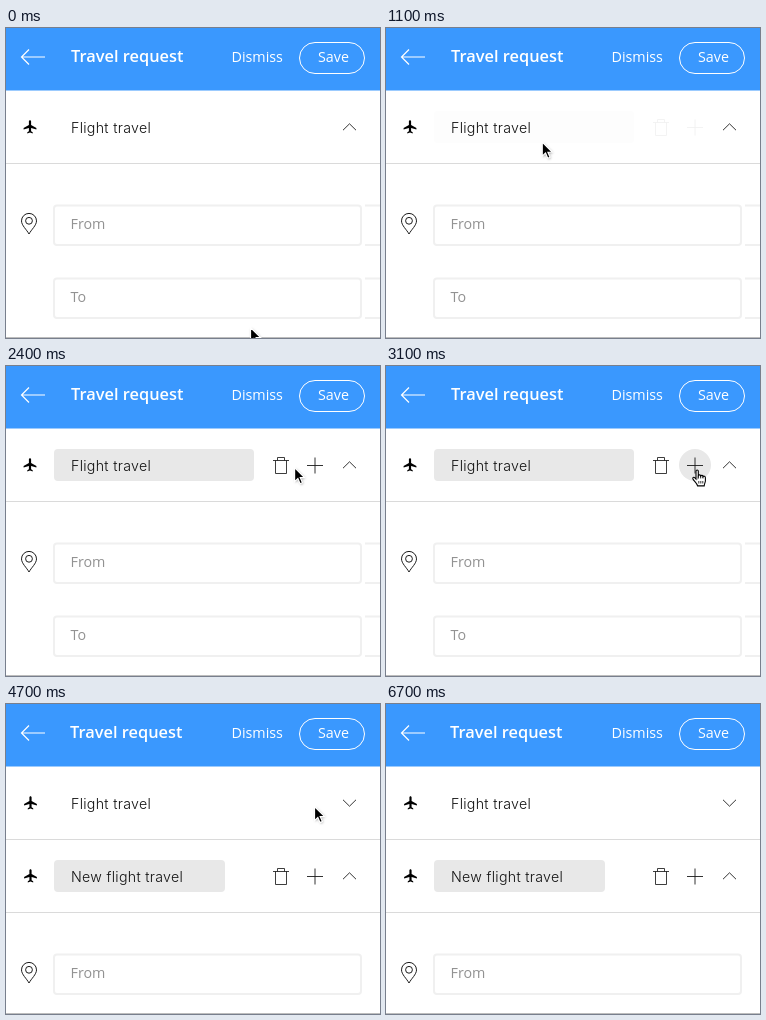
These frames come from a looping animation (374x310 px, 6800 ms). An HTML page with a canvas:

```html
<!DOCTYPE html>
<html lang="en">
<head>
<meta charset="utf-8">
<title>Travel request</title>
<style>
  html, body { margin: 0; width: 100%; height: 100%; overflow: hidden; background: #fff; }
  canvas { display: block; width: 374px; height: 310px; }
</style>
</head>
<body>
<canvas id="stage"></canvas>
<script>
const W = 374, H = 310, LOOP = 6800, STEP = 100;
const BLUE = '#3a98fe', INK = '#1c1c1c', GREY = '#e8e8e8', EDGE = '#f0f0f0';
const SANS = '14.3px "Open Sans", sans-serif';
const TITLE = '600 16.4px "Open Sans", sans-serif';
const LABEL = '300 14.2px Inter, sans-serif';
const scale = window.devicePixelRatio || 1;

function prepare(canvas) {
  canvas.width = Math.round(W * scale);
  canvas.height = Math.round(H * scale);
  const c = canvas.getContext('2d');
  c.scale(scale, scale);
  c.lineJoin = 'miter';
  return c;
}

// ---- drawing helpers ----

function text(c, str, x, y, font, color, spacing = 0) {
  c.font = font;
  c.letterSpacing = spacing + 'px';
  c.fillStyle = color;
  c.fillText(str, x, y);
}

function lines(c, d, color = INK, width = 1) {
  c.strokeStyle = color;
  c.lineWidth = width;
  c.stroke(new Path2D(d));
}

function box(c, x, y, w, h, r, fill, stroke, width = 1) {
  c.beginPath();
  c.roundRect(x, y, w, h, r);
  if (fill) { c.fillStyle = fill; c.fill(); }
  if (stroke) { c.strokeStyle = stroke; c.lineWidth = width; c.stroke(); }
}

function at(c, x, y, draw) {
  c.save();
  c.translate(x, y);
  draw(c);
  c.restore();
}

// ---- icons, each around its own origin ----

const PLANE = new Path2D(
  'M0 -6.8C.7 -6.8 1.1 -6.2 1.1 -5.4V-1.9L6.4 1.1V2.5L1.1 1V4.2L2.7 5.2V6.4' +
  'L0 5.6L-2.7 6.4V5.2L-1.1 4.2V1L-6.4 2.5V1.1L-1.1 -1.9V-5.4C-1.1 -6.2 -.7 -6.8 0 -6.8Z');

function plane(c) {
  c.fillStyle = '#000';
  c.fill(PLANE);
}

function pin(c) {
  lines(c, 'M0 12.8C-2.2 8.6 -7.5 4.2 -7.5 -.3A7.5 7.5 0 0 1 7.5 -.3C7.5 4.2 2.2 8.6 0 12.8Z');
  lines(c, 'M3.4 -.4A3.4 3.4 0 1 1 -3.4 -.4A3.4 3.4 0 1 1 3.4 -.4Z');
}

function trash(c) {
  lines(c, 'M-8 -5H8M-3.5 -5V-8H3.5V-5M-5.5 -5V8H5.5V-5', INK, .85);
}

function plus(c) {
  lines(c, 'M-8 0H8M0 -8V8', INK, .9);
}

function chevron(c, up) {
  lines(c, up ? 'M-6.5 3.2L0 -3.2L6.5 3.2' : 'M-6.5 -3.2L0 3.2L6.5 -3.2', INK, .9);
}

// ---- parts of the form ----

function header(c, titleX) {
  c.fillStyle = '#fff';
  c.fillRect(0, 0, W, H);
  c.fillStyle = BLUE;
  c.fillRect(0, 0, W, 62.5);
  lines(c, 'M39 29H15.5M23 21.5L15.5 29L23 36.5', '#fff', 1.2);
  text(c, 'Travel request', titleX, 34, TITLE, '#fff');
  text(c, 'Dismiss', 225.5, 34, SANS, '#fff');
  box(c, 293.5, 14.5, 65, 31, 15.5, null, '#fff');
  text(c, 'Save', 312, 34, SANS, '#fff');
  lines(c, 'M0 309.5H374', '#bdbdbd');
}

function row(c, y, label, planeX, open, highlight) {
  if (highlight) {
    box(c, 48, y - 16, highlight, 32, 4, GREY);
    at(c, 275, y + .5, trash);
    at(c, 309, y + .5, plus);
  }
  at(c, planeX, y, plane);
  text(c, label, 65, y + 5.5, LABEL, '#111', .3);
  at(c, 343.5, y, k => chevron(k, open));
  lines(c, `M0 ${y + 36.5}H374`, '#dadada');
}

function field(c, y, label) {
  box(c, 48, y + .5, 307, 39.5, 3, '#fff', EDGE, 2);
  text(c, label, 64.5, y + 24, SANS, '#929292');
}

function formView(highlight) {
  return c => {
    header(c, 65);
    row(c, 99, 'Flight travel', 24, true, highlight);
    at(c, 23, 193.2, pin);
    field(c, 177, 'From');
    field(c, 250, 'To');
  };
}

function addedView(c) {
  header(c, 64);
  row(c, 99, 'Flight travel', 24.5, false, 0);
  row(c, 172, 'New flight travel', 24.5, true, 171);
  at(c, 23, 266.2, pin);
  field(c, 250, 'From');
}

function layer(draw) {
  const canvas = document.createElement('canvas');
  draw(prepare(canvas));
  return canvas;
}

// ---- pointers ----

const ARROW = new Path2D('M.5 .5V14.6L3.8 11.5L6 16.6L8.4 15.6L6.2 10.6H10.7Z');
const HAND = new Path2D(
  'M4 1.6C4 .2 6.3 .2 6.3 1.6V6.2C6.6 5 8.6 5.1 8.7 6.5C9.2 5.5 11 5.7 11 7.1' +
  'C11.6 6.3 13.4 6.6 13.4 8.2V11.2C13.4 13 12.4 13.8 12.2 16.4H5.6' +
  'C5.3 14.2 2.6 12.2 1 9.6C.2 8.2 1.8 7.2 2.9 8.3L4 9.5Z');

function arrow(c) {
  c.fillStyle = '#000';
  c.strokeStyle = '#fff';
  c.lineWidth = 1.2;
  c.shadowColor = 'rgba(0,0,0,.4)';
  c.shadowBlur = 2.5 * scale;
  c.shadowOffsetX = .8 * scale;
  c.shadowOffsetY = scale;
  c.fill(ARROW);
  c.shadowColor = 'transparent';
  c.stroke(ARROW);
}

function hand(c) {
  c.fillStyle = '#fff';
  c.fill(HAND);
  c.strokeStyle = '#000';
  c.lineWidth = 1.1;
  c.stroke(HAND);
  lines(c, 'M6.3 6V9M8.7 6.5V9M11 7V9M6.8 11.5V14M8.8 11.5V14M10.8 11.5V14', '#000', .8);
}

// ---- motion ----

const clamp = u => Math.min(1, Math.max(0, u));
const sine = u => (1 - Math.cos(Math.PI * u)) / 2;
const quart = u => u < .5 ? 8 * u ** 4 : 1 - 8 * (1 - u) ** 4;
const slowIn = u => u ** 1.4;
const slowOut = u => 1 - (1 - u) ** 1.64;
const progress = (t, start, end, ease) => ease(clamp((t - start) / (end - start)));

// start, end, target x, target y, easing
const MOVES = [
  [150, 1370, 154, 110, quart],
  [1700, 1900, 200.5, 97.5, slowIn],
  [1900, 2700, 310, 102, slowOut],
  [3200, 3500, 307, 102, sine],
  [3900, 4500, 308, 102, sine],
  [5100, 5400, 310, 195, sine],
  [5500, 5800, 310, 193, sine],
  [6300, 6650, 347, 198, sine]
];

function pointerAt(t) {
  let x = 244, y = 299;
  for (const [start, end, tx, ty, ease] of MOVES) {
    if (t <= start) break;
    const p = progress(t, start, end, ease);
    x += (tx - x) * p;
    y += (ty - y) * p;
  }
  return [x, y];
}

// ---- scene ----

const stage = prepare(document.getElementById('stage'));
const plain = layer(formView(0));
const hovered = layer(formView(200));
const added = layer(addedView);

function show(canvas, alpha) {
  if (alpha <= 0) return;
  stage.globalAlpha = alpha;
  stage.drawImage(canvas, 0, 0, W, H);
  stage.globalAlpha = 1;
}

function render(t) {
  show(plain, 1);
  show(hovered, progress(t, 1020, 1560, sine));
  if (t < 3900) {
    lines(stage, 'M359 177.5H374M359 217H374M359 250.5H374M359 290H374', EDGE, 2);
  }
  if (t >= 3100 && t < 4500) {
    box(stage, 293, 83, 32, 32, 16, GREY);
    at(stage, 309, 99.5, plus);
  }
  show(added, progress(t, 3900, 4500, sine));

  if (t >= 6700) return;
  const [x, y] = pointerAt(t);
  if (t >= 2700 && t < 3700) at(stage, x - 4, y + 1.5, hand);
  else at(stage, x, y, arrow);
}

const begin = performance.now();

function tick() {
  const t = (performance.now() - begin) % LOOP;
  render(Math.floor(t / STEP) * STEP);
  requestAnimationFrame(tick);
}

render(0);
requestAnimationFrame(tick);
</script>
</body>
</html>
```
